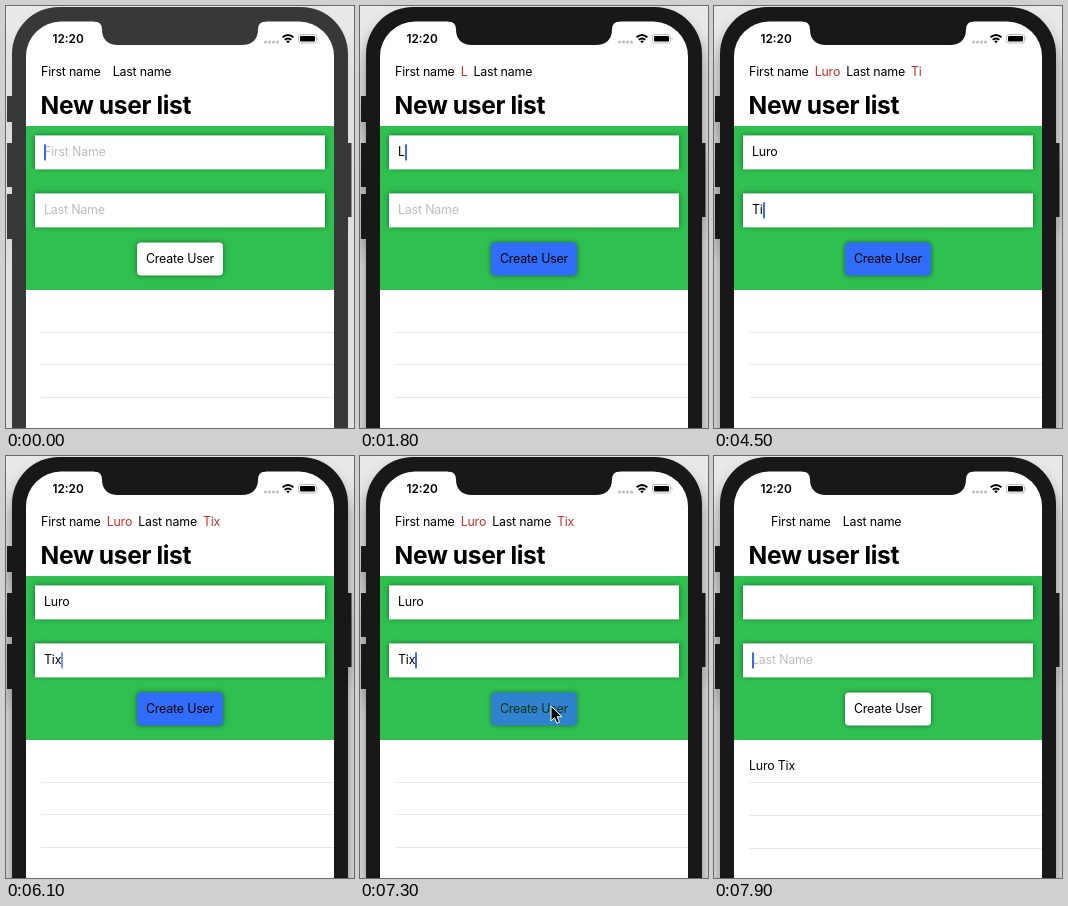
Recreate the animation shown at these times as an HTML page. Size 348x422 px, loop 8000 ms.

```html
<!DOCTYPE html>
<html lang="en">
<head>
<meta charset="utf-8">
<title>New user list</title>
<style>
  html, body { margin: 0; width: 100%; height: 100%; overflow: hidden; }
  body { position: relative; background: #e9e9e9; font: 12.4px/16px Inter, sans-serif; letter-spacing: -.18px; color: #000; white-space: pre; }
  svg, .abs, .field, .line { position: absolute; }
  svg { left: 0; top: 0; }
  #time { left: 46.5px; top: 25px; font-size: 11.8px; font-weight: 600; letter-spacing: 0; }
  #header { left: 35px; top: 58px; display: flex; gap: 6px; }
  #header b { font-weight: 400; color: #c2332b; }
  h1 { margin: 0; left: 34.6px; top: 83px; font: 700 24.6px/32px Inter, sans-serif; letter-spacing: -.38px; }
  #form { left: 20px; top: 120px; width: 308px; height: 164px; background: #30c050; }
  .field, #button { box-shadow: 0 0 5px rgba(0,0,0,.5); transform: translateY(.4px); }
  .field { left: 29px; width: 281px; height: 34px; padding-left: 9px; background: #fff; line-height: 34px; }
  .hint { position: absolute; left: 9px; color: #bdbdbd; }
  .caret { display: inline-block; width: 2px; height: 16px; margin-top: -1px; vertical-align: middle; background: #3a6cee; position: relative; }
  #button { left: 131px; top: 236px; width: 86px; height: 33px; border-radius: 4px; line-height: 34px; text-align: center; }
  #row { left: 35px; top: 302px; }
  .line { left: 35px; width: 293px; height: 1px; background: #e8e8e8; }
</style>
</head>
<body>
<svg width="348" height="422">
  <g id="bezel">
    <path d="M1 90h6v26h-6zM1 137h6v44h-6zM1 188h6v45h-6zM341 137h4.5v74h-4.5z"/>
    <rect x="6" y="1" width="336" height="520" rx="47"/>
  </g>
  <rect x="20" y="15.5" width="308" height="500" rx="35" fill="#fff"/>
  <path id="notch" d="M88 14.5v1q8 0 8 8c0 10 6 15.5 16 15.5H236c10 0 16-5.5 16-15.5q0-8 8-8v-1z"/>
  <path d="M259.5 36H272" stroke="#bbb" stroke-width="3" stroke-linecap="round" stroke-dasharray="0 4"/>
  <g fill="none" stroke="#000" stroke-width="1.9">
    <path d="M276.6 31.2q5.4-4.6 10.8 0M278.7 33.8q3.3-2.8 6.6 0"/>
    <path d="M282 37.2l-1.8-2q1.8-1.4 3.6 0z" fill="#000" stroke="none"/>
  </g>
  <rect x="292.5" y="28.5" width="18" height="8.5" rx="2.5" fill="none" stroke="#bbb"/>
  <rect x="294" y="30" width="15" height="5.5" rx="1.2"/>
  <path d="M311.8 31q1.6 1.7 0 3.4z" fill="#aaa"/>
</svg>
<div class="abs" id="time">12:20</div>
<div class="abs" id="header"><span>First name</span><b></b><span>Last name</span><b></b></div>
<h1 class="abs">New user list</h1>
<div class="abs" id="form"></div>
<div class="field" style="top:129px"><span class="hint">First Name</span><span class="text"></span><i class="caret"></i></div>
<div class="field" style="top:187px"><span class="hint">Last Name</span><span class="text"></span><i class="caret"></i></div>
<div class="abs" id="button">Create User</div>
<div class="abs" id="row">Luro Tix</div>
<div class="line" style="top:326px"></div>
<div class="line" style="top:358px"></div>
<div class="line" style="top:391px"></div>
<svg width="348" height="422"><path id="mouse" d="M0 0V15l3.5-3.3 2.4 5.5 2.6-1.1-2.4-5.3H11z" stroke="#fff"/></svg>
<script>
const LOOP = 8000, TICK = 100;
const FOCUS = 200, NEXT_FIELD = 3700, PRESS = 7100, SUBMIT = 7400;
const firstKeys = [1800, 2000, 2200, 2700], lastKeys = [4100, 4500, 4900];
const activity = [FOCUS, ...firstKeys, NEXT_FIELD, ...lastKeys, SUBMIT];

const $ = s => document.querySelector(s), all = s => [...document.querySelectorAll(s)];
const labels = all('#header b'), hints = all('.hint'), texts = all('.text');
const carets = all('.caret'), lines = all('.line');

const clamp = x => Math.min(1, Math.max(0, x));
const ramp = (t, from, to) => clamp((t - from) / (to - from));
const mix = (a, b, p) => a + (b - a) * p;
const typed = (word, keys, t) => t < SUBMIT ? word.slice(0, keys.filter(k => k <= t).length) : '';

// Solid just after any activity, then a one-second blink
function blink(t) {
  const idle = t - Math.max(...activity.filter(k => k <= t), 0);
  return clamp(.5 + .7 * Math.cos(Math.max(0, idle - 400) / 1000 * 2 * Math.PI));
}

function draw(t) {
  const words = [typed('Luro', firstKeys, t), typed('Tix', lastKeys, t)];
  const active = t < NEXT_FIELD ? 0 : 1;
  const done = ramp(t, SUBMIT - TICK, SUBMIT + 300);
  words.forEach((word, i) => {
    labels[i].textContent = texts[i].textContent = word;
    carets[i].style.opacity = i === active ? blink(t) : 0;
    hints[i].style.opacity = word ? 0 : t < SUBMIT ? 1 : i * done;
  });

  $('#header').style.marginLeft = 22 * done + 'px';
  $('#row').style.opacity = done;
  lines.forEach((line, i) => line.style.transform = `translateY(${i && Math.round(done)}px)`);

  const button = $('#button').style;
  button.background = words[0] ? '#2f6dfa' : '#fff';
  button.opacity = t < SUBMIT ? mix(1, .74, ramp(t, PRESS, PRESS + 200)) : 1;

  // The window comes to the front: darker body, deeper shadow
  const front = 1 - (1 - ramp(t, 0, 400)) ** 2;
  const shade = Math.round(mix(56, 24, front));
  $('#bezel').style.fill = $('#notch').style.fill = `rgb(${shade},${shade},${shade})`;
  $('#bezel').style.filter = `drop-shadow(0 14px 9px rgba(0,0,0,${mix(.1, .45, front)}))`;

  const enter = 1 - (1 - ramp(t, 6200, PRESS)) ** 2, leave = ramp(t, SUBMIT, SUBMIT + 300) ** 1.5;
  const x = mix(mix(356, 191, enter), 362, leave), y = mix(mix(132, 250, enter), 420, leave);
  $('#mouse').setAttribute('transform', `translate(${x} ${y})`);
}

function frame() {
  draw(Math.floor(performance.now() % LOOP / TICK) * TICK);
  requestAnimationFrame(frame);
}
frame();
</script>
</body>
</html>
```
